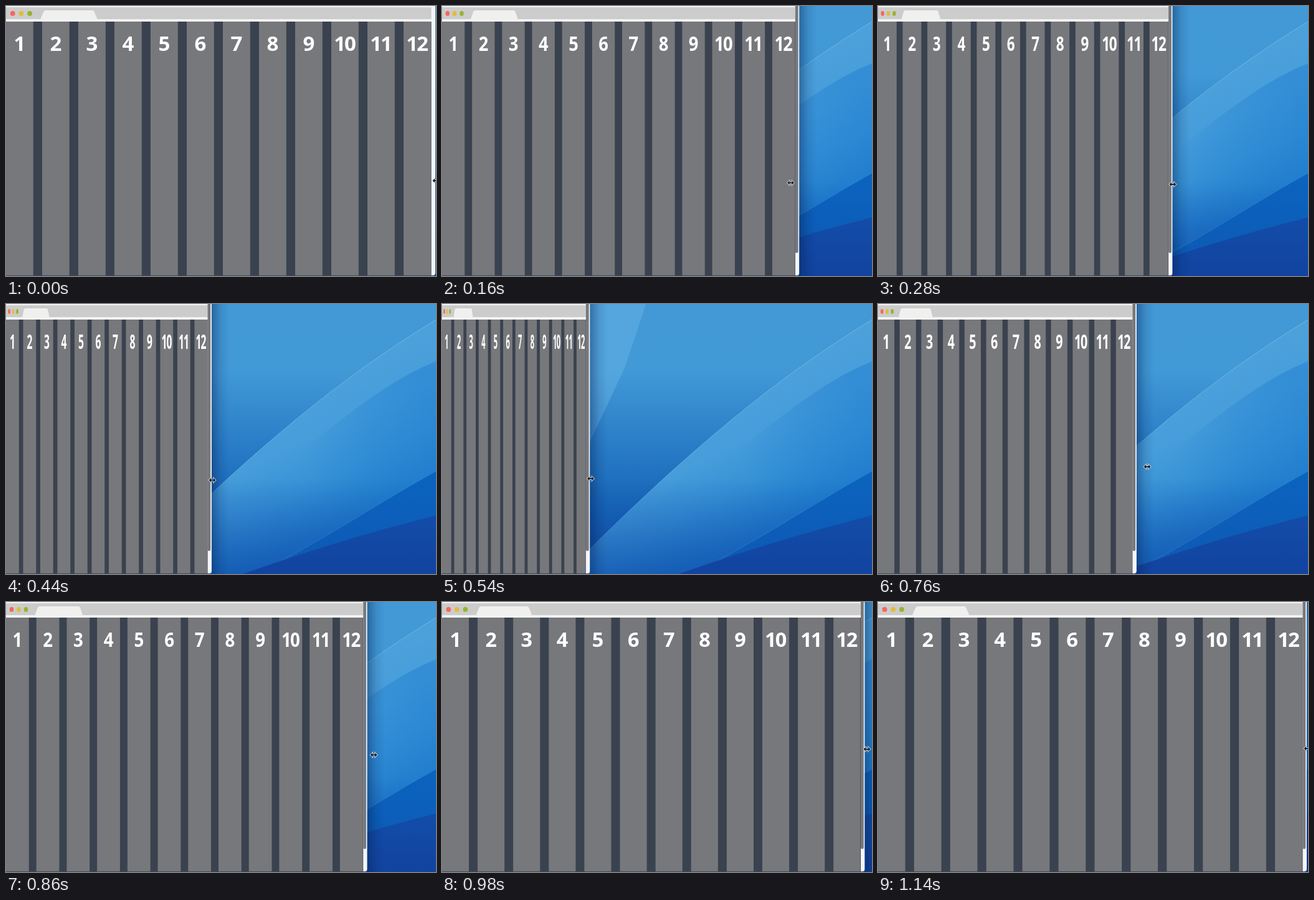
Write an HTML page with a canvas that moves like this. It is 690 px wide and 433 px high and loops after 1180 ms.

```html
<!DOCTYPE html>
<html lang="en">
<head>
<meta charset="utf-8">
<title>Twelve columns</title>
<style>
html, body { margin: 0; width: 100%; height: 100%; overflow: hidden; background: #2a7fc8; }
canvas { display: block; }
</style>
</head>
<body>
<canvas id="stage" width="690" height="433"></canvas>
<script>
const ctx = document.getElementById('stage').getContext('2d');
const W = 690, H = 433, LOOP = 1180;
const TURN = 565, END = 1100;       // narrowest moment, back at full width
const WIDE = 689, NARROW = 214;     // window edge
const FULL = 682.5, BAR = WIDE - FULL;
const COLS = 12, PITCH = 58, HEAD = 25;

const clamp = v => Math.min(1, Math.max(0, v));
const hump = u => Math.sin(Math.PI * clamp(u)) ** 2;

// Window edge and pointer: a steady pull inward, then a quick, soft pull back
function pose(t) {
  if (t < TURN) {
    const p = (t / TURN) ** 1.12;
    return {
      edge: WIDE + (NARROW - WIDE) * p,
      lag: 1 - 15 * hump(t / 300),
      y: 280 + 6 * hump(t / TURN)
    };
  }
  const u = clamp((t - TURN) / (END - TURN));
  const p = 1 - (1 - u ** 2.14) ** 4.5;
  return {
    edge: NARROW + (WIDE - 1 - NARROW) * p,
    lag: 1 + 18 * hump(Math.sqrt(u)),
    y: 280 - 45 * p
  };
}

function fade(x0, y0, x1, y1, ...colors) {
  const g = ctx.createLinearGradient(x0, y0, x1, y1);
  colors.forEach((c, i) => g.addColorStop(i / (colors.length - 1), c));
  return g;
}

function rect(x, y, w, h, fill) {
  ctx.fillStyle = fill;
  ctx.fillRect(x, y, w, h);
}

function round(x, y, w, h, r, fill) {
  ctx.beginPath();
  ctx.roundRect(x, y, w, h, r);
  ctx.fillStyle = fill;
  ctx.fill();
}

// A bezier ridge from the right side, filled down to the bottom
function ridge(y, curve, fill, line) {
  const top = new Path2D();
  top.moveTo(W, y);
  top.bezierCurveTo(...curve);
  const area = new Path2D(top);
  area.lineTo(curve[4], H);
  area.lineTo(W, H);
  ctx.fillStyle = fill;
  ctx.fill(area);
  if (line) {
    ctx.strokeStyle = line;
    ctx.stroke(top);
  }
}

function wallpaper() {
  rect(0, 0, W, H, fade(0, 0, 0, H, '#4299d6', '#4199d6', '#2b7fc8', '#1766b8', '#124ea5'));

  ctx.fillStyle = 'rgba(120,190,235,.35)';
  ctx.beginPath();
  ctx.moveTo(327, 0);
  ctx.quadraticCurveTo(308, 60, 292, 105);
  ctx.lineTo(200, 300);
  ctx.lineTo(200, 0);
  ctx.fill();

  ridge(25, [560, 105, 420, 208, 200, 430],
    fade(470, 150, 590, 400, '#4ca1db', '#469dda', '#3590d5', '#217dcd', '#1a6fc4'),
    'rgba(150,205,240,.5)');
  ridge(92, [590, 132, 500, 220, 380, 310],
    fade(690, 180, 490, 270, 'rgba(32,126,208,.5)', 'rgba(32,126,208,.3)', 'rgba(32,126,208,0)'));
  rect(0, 280, W, H - 280, fade(0, 280, 0, H, 'rgba(14,72,165,0)', 'rgba(14,72,165,.6)'));
  ridge(268, [610, 312, 530, 365, 440, 413],
    fade(0, 270, 0, H, '#0b64be', '#0d58b4'), 'rgba(80,160,225,.35)');
  ridge(339, [600, 362, 510, 387, 360, 440], fade(0, 340, 0, H, '#124da9', '#1243a0'));
}

function tab() {
  ctx.fillStyle = '#f0f0ef';
  ctx.beginPath();
  ctx.moveTo(55, 22);
  ctx.lineTo(60, 10);
  ctx.quadraticCurveTo(61, 7, 65, 7);
  ctx.lineTo(138, 7);
  ctx.quadraticCurveTo(141, 7, 142, 10);
  ctx.lineTo(147, 22);
  ctx.fill();
}

function page() {
  rect(0, 0, FULL, HEAD, '#f3f3f3');
  rect(0, 2, FULL, 19, '#cccccc');
  tab();
  ['#f8655a', '#dfbe3a', '#97b32c'].forEach((c, i) => round(6.8 + 13.7 * i, 8, 7.8, 7.8, 4, c));

  rect(0, HEAD, FULL, H - HEAD, '#3a424f');
  ctx.font = 'bold 33px "Open Sans", "Noto Sans", sans-serif';
  ctx.letterSpacing = '-2px';
  ctx.textAlign = 'center';
  for (let i = 0; i < COLS; i++) {
    rect(PITCH * i, HEAD, PITCH * 0.755, H - HEAD, '#77787b');
    ctx.fillStyle = '#fff';
    ctx.fillText(i + 1, PITCH * i + 21, 72);
  }
}

function browser(edge, scrolling) {
  const inner = edge - BAR;
  rect(edge, 0, 28, H,
    fade(edge, 0, edge + 28, 0, 'rgba(4,30,80,.4)', 'rgba(4,30,80,.12)', 'rgba(4,30,80,0)'));
  ctx.save();
  ctx.beginPath();
  ctx.roundRect(0, 0, edge, H - 1, [0, 0, 4, 0]);
  ctx.clip();
  rect(0, 0, edge, H, '#f5f6f7');
  ctx.save();
  ctx.scale(inner / FULL, 1);
  page();
  ctx.restore();
  if (scrolling) round(inner, -4, 4.7, 400, 2, '#77787c');
  ctx.restore();
  rect(0, H - 1, edge - 3, 1, '#39495f');
}

function pointer(x, y) {
  ctx.save();
  ctx.translate(x, y);
  ctx.beginPath();
  for (const s of [1, -1]) {
    ctx.lineTo(-2 * s, -s);
    ctx.lineTo(2 * s, -s);
    ctx.lineTo(2 * s, -3.5 * s);
    ctx.lineTo(5.5 * s, 0);
    ctx.lineTo(2 * s, 3.5 * s);
    ctx.lineTo(2 * s, s);
  }
  ctx.closePath();
  ctx.strokeStyle = '#dfe3e8';
  ctx.lineWidth = 1.6;
  ctx.stroke();
  ctx.fillStyle = '#1c1f24';
  ctx.fill();
  ctx.restore();
}

function draw(now) {
  // Steps of 20 ms; the opening picture holds for two
  const step = Math.floor(now % LOOP / 20);
  const t = step < 2 ? 0 : step * 20;
  const { edge, lag, y } = pose(t);
  ctx.lineWidth = 1;
  wallpaper();
  browser(edge, t > 0);
  pointer(edge + lag, y);
  requestAnimationFrame(draw);
}

requestAnimationFrame(draw);
</script>
</body>
</html>
```
